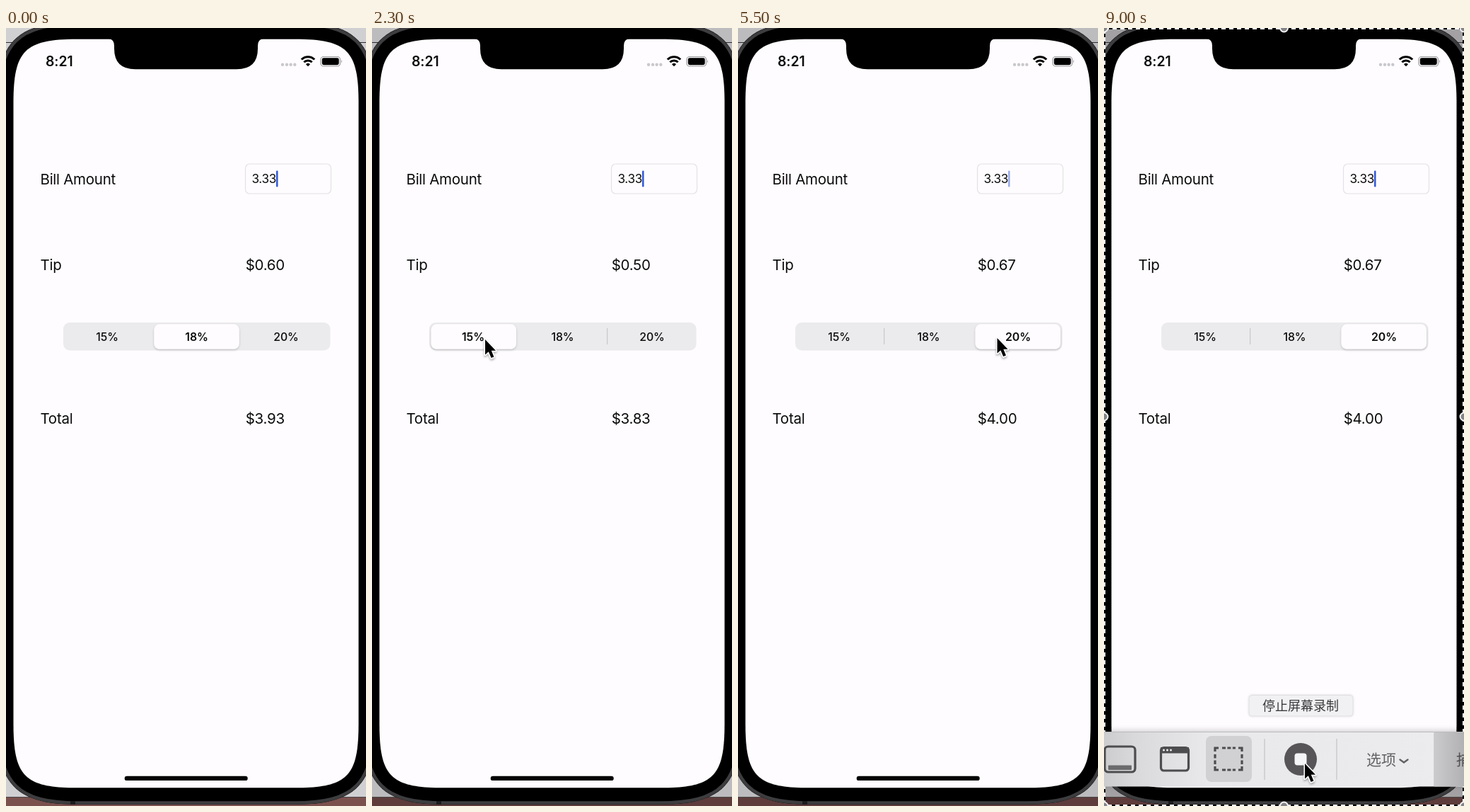
Write an HTML page that moves like this. It is 509 px wide and 1099 px high and loops after 9.4 s.

```html
<!DOCTYPE html>
<html lang="en">
<head>
<meta charset="utf-8">
<title>Tip calculator</title>
<style>
  html, body { margin: 0; width: 100%; height: 100%; overflow: hidden; background: #000; }
  svg { display: block; width: 509px; height: 1099px; }
  text { font-family: Inter, "Noto Sans", sans-serif; fill: #0b0b0c; }
  .label { font-size: 20.5px; letter-spacing: -.27px; }
  .field { font-size: 17.2px; letter-spacing: -.4px; }
  .seg { font-size: 15.8px; font-weight: 500; letter-spacing: -.1px; text-anchor: middle; }
  .clock { font-size: 19.4px; font-weight: 600; letter-spacing: -.1px; }
  .cjk { font-family: "Noto Sans CJK SC", "Noto Sans CJK", sans-serif; }
</style>
</head>
<body>
<svg viewBox="0 0 509 1099" xmlns="http://www.w3.org/2000/svg">
  <defs>
    <filter id="soft" x="-20%" y="-30%" width="140%" height="180%">
      <feDropShadow dx="0" dy="1.5" stdDeviation="1.6" flood-opacity=".2"/>
    </filter>
    <filter id="glow" x="-20%" y="-40%" width="140%" height="180%">
      <feDropShadow dx="0" dy="0" stdDeviation="1.5" flood-opacity=".14"/>
    </filter>
    <filter id="cast" x="-50%" y="-30%" width="220%" height="190%">
      <feDropShadow dx="0" dy="2" stdDeviation="1.6" flood-opacity=".35"/>
    </filter>
    <filter id="lift" x="-5%" y="-30%" width="110%" height="160%">
      <feDropShadow dx="0" dy="-1" stdDeviation="4" flood-opacity=".22"/>
    </filter>
    <linearGradient id="bar">
      <stop offset="0" stop-color="#c9c8ca"/>
      <stop offset=".1" stop-color="#d9d8da"/>
      <stop offset=".3" stop-color="#e9e8ea"/>
      <stop offset="1" stop-color="#ecebed"/>
    </linearGradient>
    <linearGradient id="barEnd">
      <stop offset="0" stop-color="#cbcacc"/>
      <stop offset="1" stop-color="#b1b0b2"/>
    </linearGradient>
  </defs>

  <!-- desktop and phone body -->
  <rect id="back" width="509" height="1099"/>
  <path d="M0 20.5H509" stroke="#2a2a2c"/>
  <rect id="desk" y="1087" width="509" height="12"/>
  <path d="M0 1086.5H509" stroke="#4a4648"/>
  <path id="body"/>
  <path id="rim" fill="none" stroke="#3d3d3f" stroke-width="4.5"/>
  <rect x="91" y="1092" width="7" height="5" fill="#1c1c1d"/>
  <path id="screen" fill="#fefcfe"/>
  <path d="M145 15Q153 16 153 25V29Q153 58.3 183 58.3H326Q356 58.3 356 29V25Q356 16 364 15Z"/>
  <rect x="167.7" y="1056.7" width="174" height="6.4" rx="3.2"/>

  <!-- status bar -->
  <text class="clock" x="56" y="54">8:21</text>
  <path d="M391 51.8h.01M397 51.8h.01M402.6 51.8h.01M408.3 51.8h.01" stroke="#c9c8cc" stroke-width="4.4" stroke-linecap="round"/>
  <g fill="none" stroke="#000" stroke-width="3">
    <path d="M417.8 44.5A13 13 0 0 1 436.2 44.5M421.3 48.3A8 8 0 0 1 432.7 48.3"/>
    <path d="M424 51.2A4.3 4.3 0 0 1 430 51.2L427 54.2Z" fill="#000" stroke="none"/>
  </g>
  <rect x="445" y="40.5" width="27.5" height="13.5" rx="4" fill="none" stroke="#9b9a9d" stroke-width="1.2"/>
  <rect x="446.8" y="42.3" width="23.9" height="9.9" rx="2.4"/>
  <path d="M474 45Q476 47.2 474 49.5Z" fill="#9b9a9d"/>

  <!-- form -->
  <text class="label" x="48.5" y="220.5">Bill Amount</text>
  <rect x="338.5" y="192" width="121" height="42" rx="6" fill="#fefcfe" stroke="#e3e2e6" stroke-width="1.2"/>
  <text class="field" x="347.5" y="219">3.33</text>
  <rect id="caret" x="382" y="201.5" width="2.5" height="23" rx="1" fill="#3058d8"/>
  <text class="label" x="48.5" y="342">Tip</text>
  <text class="label" x="338.7" y="342" id="tip"></text>
  <text class="label" x="48.5" y="559">Total</text>
  <text class="label" x="338.7" y="559" id="total"></text>

  <!-- segmented control -->
  <rect x="81" y="416" width="377.5" height="39.5" rx="9" fill="#ebeaec"/>
  <rect id="sepLeft" x="206" y="424" width="1.2" height="23" fill="#c8c7ca"/>
  <rect id="sepRight" x="332" y="424" width="1.2" height="23" fill="#c8c7ca"/>
  <rect id="pill" y="418.3" width="120.5" height="35.2" rx="8" fill="#fefcfe" filter="url(#soft)"/>
  <text class="seg" x="143" y="441.7">15%</text>
  <text class="seg" x="269.5" y="441.7">18%</text>
  <text class="seg" x="396" y="441.7">20%</text>

  <!-- screen recorder -->
  <g id="recorder">
    <rect x="1" y="1" width="507" height="1097" fill="none" stroke="#000" stroke-width="2"/>
    <rect x="1" y="1" width="507" height="1097" fill="none" stroke="#fff" stroke-width="2" stroke-dasharray="6 5"/>
    <g id="handles" fill="#858487" stroke="#f4f3f5" stroke-width="2"></g>
    <g filter="url(#lift)">
      <rect x="-10" y="994" width="529" height="77.5" fill="url(#bar)"/>
    </g>
    <rect x="467" y="994" width="42" height="77.5" fill="url(#barEnd)"/>
    <path d="M0 994.5H509" stroke="#bbbabd"/>
    <path d="M227 1004V1062M329 1004V1062M467 994V1071" stroke="#c6c5c8" stroke-width="1.3"/>
    <rect x="144" y="1000" width="65" height="65" rx="8" fill="#d1d0d3"/>
    <g fill="none" stroke="#4d4c4f" stroke-width="3.2">
      <rect x="1" y="1015" width="43" height="36" rx="5"/>
      <rect x="80.5" y="1016.5" width="39" height="32.5" rx="4"/>
      <path d="M157 1022V1017H162M190 1017H195V1022M195 1043V1048H190M162 1048H157V1043"/>
      <path d="M167 1017H186M167 1048H186" stroke-dasharray="5 2.4"/>
      <path d="M157 1026V1040M195 1026V1040" stroke-dasharray="5.5 3"/>
    </g>
    <rect x="6" y="1041.5" width="33" height="6.5" rx="1" fill="#6b6a6d"/>
    <path d="M80 1016H120V1024.5H80Z" fill="#4d4c4f"/>
    <path d="M84.5 1020h.01M89.5 1020h.01M94.5 1020h.01" stroke="#eceaed" stroke-width="3" stroke-linecap="round"/>
    <circle cx="278" cy="1033" r="23" fill="#575558"/>
    <rect x="269.5" y="1024.5" width="17" height="17" rx="4" fill="#f5f4f6"/>
    <text class="cjk" x="371" y="1041" font-size="21" style="fill:#626164">选项</text>
    <path d="M418.5 1033.5L424 1037.5L429.5 1033.5" fill="none" stroke="#626164" stroke-width="2.4" stroke-linecap="round"/>
    <text class="cjk" x="498" y="1041" font-size="21" style="fill:#4f4e51">捕</text>
  </g>
  <g id="hint">
    <rect x="205" y="942.5" width="147" height="29.5" rx="4" fill="#f1f0f2" stroke="#dfdee1" filter="url(#glow)"/>
    <text class="cjk" x="278" y="964" font-size="18" text-anchor="middle" style="fill:#39383b">停止屏幕录制</text>
  </g>

  <!-- pointers -->
  <g id="arrow" filter="url(#cast)">
    <path d="M0 0V21.5L4.8 17.2L8.6 26L12.4 24.4L8.8 15.8H15Z" stroke="#fff" stroke-width="3" paint-order="stroke" stroke-linejoin="round"/>
  </g>
  <g id="hand" filter="url(#cast)" stroke="#111" stroke-width="1.6" stroke-linejoin="round" stroke-linecap="round">
    <path fill="#fff" d="M6 17L1.5 12Q0 9.5 2 8.8Q3.8 8.4 5.2 10.4L7 12.2L4.6 5.5Q4 3 6 2.6Q7.6 2.4 8.4 4.6L10.6 10L10 3Q10 .8 12 .8Q14 .8 14.2 3L15 10L16 3.6Q16.6 1.6 18.4 2Q20.2 2.5 19.9 4.8L19 11.5L21 7.5Q22.4 5.8 24 6.8Q25.2 7.8 24.4 9.6Q23 14 21.6 19L20.5 26H10Q8.5 21 6 17Z"/>
    <path d="M11.5 15.5V21.5M15 15.5V21.5M18.5 15.5V21.5" fill="none" stroke-width="1.3"/>
  </g>
</svg>
<script>
const LOOP = 9400, STEP = 100, BILL = 3.33;
const RATES = [15, 18, 20];
const PILL_X = [83.5, 209.3, 335.5];
const FOCUS = 1700, RECORDER = 7300, HINT = 8600;

// [time, x, y]
const POINTER = [
  [100, 234, 635], [200, 334, 783], [300, 334, 783], [400, 400, 930],
  [500, 330, 1066], [600, 150, 1010], [700, 16, 800], [800, 60, 480],
  [900, 230, 230], [1000, 400, 192], [1100, 417, 300], [1200, 250, 410],
  [1300, 130, 452], [1400, 116.5, 459], [1500, 116.5, 459], [1700, 138, 440],
  [2200, 138, 440], [2300, 160, 440], [2500, 262, 438], [2800, 262, 438],
  [3100, 361.5, 437], [3200, 366.5, 438], [7300, 366.5, 438], [7600, 352, 610],
  [7700, 352, 610], [8000, 326, 763], [8400, 286, 1036], [8800, 286, 1036],
  [8900, 284, 1039]
];
// [time, opacity] within one second
const BLINK = [[0, 1], [400, 1], [600, 0], [700, 0], [1000, 1]];
// [press, release, segment]
const TAPS = [[1700, 1800, 0], [2500, 2600, 1], [3300, 3400, 2]];
const SLIDE = 300;

const $ = id => document.getElementById(id);
const segs = [...document.querySelectorAll('.seg')];

// Rectangle with smooth corners: e is the corner's reach, c the handle's distance.
function squircle(l, t, r, b, e, c) {
  return `M${l + e} ${t}H${r - e}C${r - c} ${t} ${r} ${t + c} ${r} ${t + e}` +
    `V${b - e}C${r} ${b - c} ${r - c} ${b} ${r - e} ${b}` +
    `H${l + e}C${l + c} ${b} ${l} ${b - c} ${l} ${b - e}` +
    `V${t + e}C${l} ${t + c} ${l + c} ${t} ${l + e} ${t}Z`;
}
$('body').setAttribute('d', squircle(-13, -8, 522, 1097, 114, 28));
$('rim').setAttribute('d', squircle(-10.5, -5.5, 519.5, 1094.5, 112, 27));
$('screen').setAttribute('d', squircle(10.5, 15.7, 498.5, 1073.3, 90, 16));

for (const x of [0, 254.5, 509])
  for (const y of [0, 549, 1099])
    if (x !== 254.5 || y !== 549)
      $('handles').insertAdjacentHTML('beforeend', `<circle cx="${x}" cy="${y}" r="5.5"/>`);

function at(track, t) {
  const i = track.findIndex(k => k[0] > t);
  if (i < 0) return track[track.length - 1].slice(1);
  if (i === 0) return track[0].slice(1);
  const a = track[i - 1], b = track[i];
  const u = (t - a[0]) / (b[0] - a[0]);
  return a.slice(1).map((v, n) => v + (b[n + 1] - v) * u);
}

const show = (id, on) => { $(id).style.display = on ? '' : 'none'; };
const place = (id, x, y) => $(id).setAttribute('transform', `translate(${x} ${y})`);
const money = v => '$' + v.toFixed(2);

function segment(t) {
  let from = 1, to = 1, u = 1, pressed = -1;
  for (const [press, release, seg] of TAPS) {
    if (t >= press && t < release) pressed = seg;
    if (t >= release) {
      from = to;
      to = seg;
      u = Math.min(1, (t - release + STEP) / (SLIDE + STEP));
    }
  }
  const ease = 1 - (1 - u) ** 3;
  return { from, to, ease, pressed };
}

function draw(t) {
  const { from, to, ease, pressed } = segment(t);
  const blend = seg => (to === seg ? ease : 0) + (from === seg ? 1 - ease : 0);
  $('pill').setAttribute('x', PILL_X[from] + (PILL_X[to] - PILL_X[from]) * ease);
  $('sepLeft').style.opacity = blend(2);
  $('sepRight').style.opacity = blend(0);
  segs.forEach((el, i) => {
    el.style.fontWeight = i === to ? 600 : 500;
    el.style.opacity = i === pressed ? .3 : 1;
  });

  const tip = BILL * RATES[to] / 100;
  $('tip').textContent = money(tip);
  $('total').textContent = money(BILL + tip);
  $('caret').style.opacity = at(BLINK, t % 1000)[0];

  const focused = t >= FOCUS, recording = t >= RECORDER;
  $('back').setAttribute('fill', recording ? '#a3a1a3' : focused ? '#bcbbbd' : '#d0cfd1');
  $('desk').setAttribute('fill', focused ? '#5d3c3b' : '#7b514e');
  show('recorder', recording);
  show('hint', t >= HINT);

  const [x, y] = at(POINTER, t);
  const grab = recording && y < 990;
  show('arrow', t >= 100 && !grab);
  show('hand', grab);
  place('arrow', x, y);
  place('hand', x, y);
}

function tick(now) {
  draw(Math.floor(now % LOOP / STEP) * STEP);
  requestAnimationFrame(tick);
}
draw(0);
requestAnimationFrame(tick);
</script>
</body>
</html>
```
